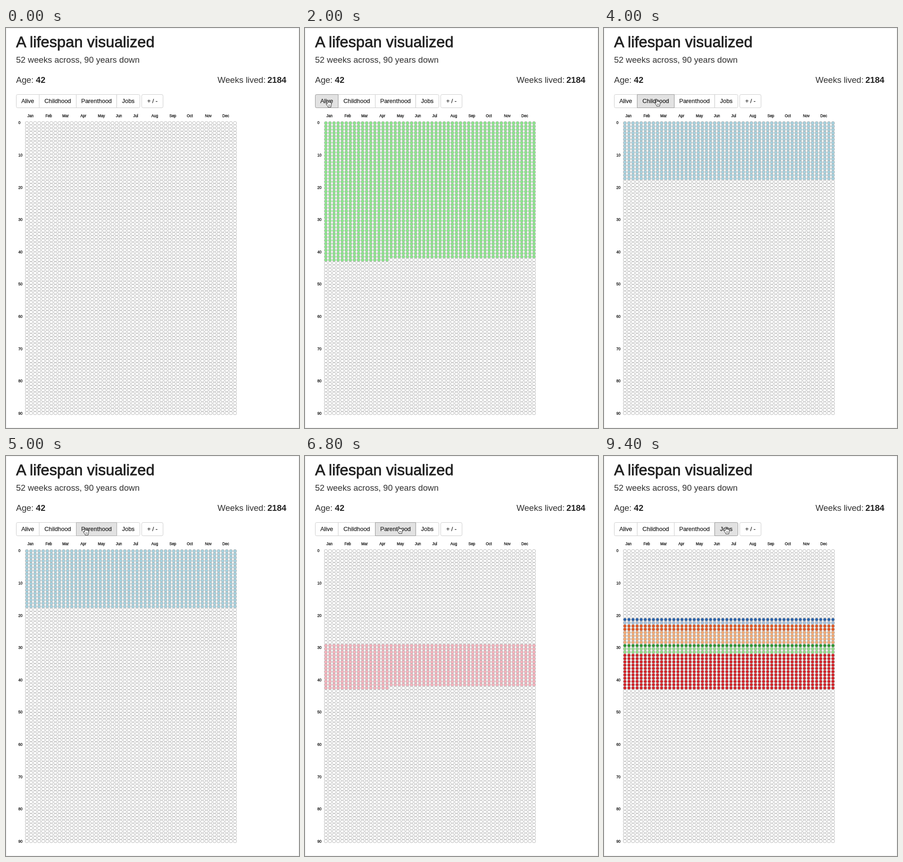
Write an HTML page with a canvas that moves like this. It is 640 px wide and 875 px high and loops after 9800 ms.

```html
<!DOCTYPE html>
<html lang="en">
<head>
<meta charset="utf-8">
<title>A lifespan visualized</title>
<style>
  html, body { margin: 0; width: 100%; height: 100%; overflow: hidden; background: #fff; }
  canvas, svg { position: absolute; left: 0; top: 0; width: 640px; height: 875px; }
  text { font-family: "Liberation Sans", Arial, sans-serif; fill: #222; white-space: pre; }
  .title { font-size: 33.6px; stroke: #222; stroke-width: .8px; }
  .lead { font-size: 18.6px; fill: #303030; }
  .bold { font-size: 18.6px; font-weight: bold; }
  .btn { font-size: 12.9px; text-anchor: middle; stroke: #222; stroke-width: .25px; }
  .tick { font-size: 8.3px; fill: #111; stroke: #111; stroke-width: .3px; }
</style>
</head>
<body>
<canvas id="grid" width="640" height="875"></canvas>
<svg id="ui" viewBox="0 0 640 875"></svg>
<script>
const LOOP = 9800, STEP = 200, DAY = 864e5;
const COLS = 52, ROWS = 90, X0 = 45.6, Y0 = 208, DX = 8.912, DY = 7.129, R = 3.56;

const ctx = document.getElementById('grid').getContext('2d');
const ui = document.getElementById('ui');

function add(tag, attrs, text) {
  const el = document.createElementNS('http://www.w3.org/2000/svg', tag);
  for (const k in attrs) el.setAttribute(k, attrs[k]);
  if (text) el.textContent = text;
  ui.appendChild(el);
  return el;
}
const label = (x, y, cls, text) => add('text', { x, y, class: cls }, text);

// Button outline with left and right corner radius
function boxPath({ x1, x2, l, r }) {
  const y1 = 145.5, y2 = 174.5;
  return `M${x1 + l} ${y1}H${x2 - r}a${r} ${r} 0 0 1 ${r} ${r}V${y2 - r}a${r} ${r} 0 0 1 ${-r} ${r}` +
    `H${x1 + l}a${l} ${l} 0 0 1 ${-l} ${-l}V${y1 + l}a${l} ${l} 0 0 1 ${l} ${-l}z`;
}

const edges = [22.5, 72.5, 153.5, 241.8, 292.5];
const buttons = ['Alive', 'Childhood', 'Parenthood', 'Jobs'].map((name, i) => (
  { name, x1: edges[i], x2: edges[i + 1], l: i === 0 ? 3 : 0, r: i === 3 ? 3 : 0 }));
buttons.push({ name: '+ / -', x1: 296.5, x2: 343, l: 3, r: 3 });

for (const b of buttons) add('path', { d: boxPath(b), fill: '#fff', stroke: '#ccc' });
const lit = add('path', { d: '' });
for (const b of buttons) label((b.x1 + b.x2) / 2, 164.3, 'btn', b.name);

add('rect', { x: .5, y: .5, width: 639, height: 874, fill: 'none', stroke: '#ececec' });
label(22, 41.8, 'title', 'A lifespan visualized');
label(22, 76, 'lead', '52 weeks across, 90 years down');
label(22, 120, 'lead', 'Age:');
label(65.3, 120, 'bold', '42');
label(462, 120, 'lead', 'Weeks lived:');
label(571, 120, 'bold', '2184');

// Month names start at the first day of each month in a leap year
'Jan Feb Mar Apr May Jun Jul Aug Sep Oct Nov Dec'.split(' ').forEach((name, i) => {
  const day = (Date.UTC(2016, i) - Date.UTC(2016, 0)) / DAY;
  label(46.8 + day * 1.271, 195, 'tick', name);
});
for (let y = 0; y <= 90; y += 10) label(27, 210.3 + y * 7.062, 'tick', String(y));

const arrow = add('path', {
  d: 'M-4 -7V5.5L-1.2 3L.8 7.5L2.8 6.6L.9 2.3H4.6z',
  fill: '#111', stroke: '#fff', 'stroke-width': .9
});
const hand = add('g', {});
const handPart = (d, fill, w) => hand.appendChild(add('path', {
  d, fill, stroke: '#222', 'stroke-width': w, 'stroke-linejoin': 'round'
}));
handPart('M-3.2 1V-6.2a1.2 1.2 0 0 1 2.4 0V-2.2q.3-1 1.3-1q1 0 1.2 1q.4-.7 1.2-.6q1 .1 1.1 1' +
  'q1.6-.3 1.7 1.2V2.5q0 1.5-1 3V7.5H-2V6q-2-2-3.5-4.5q-.8-1.4.2-1.8q1-.3 2.1 1.3z', '#fff', 1);
handPart('M-.6 2v2.8M1.2 2v2.8M3 2v2.8', 'none', .7);

// Each view gives the colour of a week
const rgb = hex => [1, 3, 5].map(i => parseInt(hex.substr(i, 2), 16));
const white = rgb('#ffffff');
const span = (from, to, hex, c = rgb(hex)) => w => w >= from && w < to ? c : white;
const now = 42 * COLS + 16;
const empty = () => white;
const alive = span(0, now, '#8ce88c');
const child = span(0, 18 * COLS, '#a8d3e0');
const parent = span(29 * COLS, now, '#f8b4be');

const jobs = [];
let year = 21;
function job(years, hex) {
  for (const c = rgb(hex); years > 0; years--) jobs[year++] = c;
}
job(1, '#2c64ac');
job(1, '#a5c2de');
job(2, '#e45824');
job(4, '#f4aa74');
job(1, '#2e9832');
job(2, '#92dc88');
job(11, '#d62228');
const work = w => jobs[Math.floor(w / COLS)] || white;

// One click per button; lead is how far the fade is in at that step
const FADE = 280;
const clicks = [
  { at: 1800, lead: 160, view: alive },
  { at: 3800, lead: 60, view: child },
  { at: 6400, lead: 60, view: parent },
  { at: 8200, lead: 160, view: work }
];

// Pointer moves: from, to, x, y
const moves = [
  [600, 1400, 52, 165.5], [2600, 3000, 113, 162], [3200, 3600, 117, 163.5],
  [4800, 5200, 195, 166], [5600, 6000, 199, 166], [6200, 6800, 207, 162],
  [7000, 7800, 268, 163]
];
const smooth = k => k * k * (3 - 2 * k);
const easeOut = k => 1 - (1 - k) ** 2;

function pointer(t) {
  let x = 4, y = 162;
  for (const [from, to, mx, my] of moves) {
    if (t < from) break;
    const k = smooth(Math.min(1, (t + STEP - from) / (to + STEP - from)));
    x += (mx - x) * k;
    y += (my - y) * k;
  }
  return { x, y };
}

function drawGrid(before, after, k) {
  ctx.fillStyle = '#fff';
  ctx.fillRect(0, 0, 640, 875);
  ctx.lineWidth = .89;
  ctx.strokeStyle = '#acacac';
  for (let w = 0; w < ROWS * COLS; w++) {
    const a = before(w), b = after(w);
    ctx.fillStyle = `rgb(${a.map((v, i) => Math.round(v + (b[i] - v) * k))})`;
    ctx.beginPath();
    ctx.arc(X0 + w % COLS * DX, Y0 + Math.floor(w / COLS) * DY, R, 0, 7);
    ctx.fill();
    ctx.stroke();
  }
}

function show(el, on) {
  el.setAttribute('visibility', on ? 'visible' : 'hidden');
}

function drawPointer(t, clicked) {
  const { x, y } = pointer(t);
  const inside = t >= moves[0][0];
  const over = buttons.findIndex(b => x - 2 >= b.x1 && x - 2 < b.x2);
  for (const el of [hand, arrow]) el.setAttribute('transform', `translate(${x} ${y})`);
  show(hand, inside && over >= 0);
  show(arrow, inside && over < 0);
  show(lit, inside && over >= 0);
  if (over < 0) return;
  const focus = clicked === over;
  lit.setAttribute('d', boxPath(buttons[over]));
  lit.setAttribute('fill', focus && t === clicks[over].at ? '#d4d4d4' : '#e2e2e2');
  lit.setAttribute('stroke', focus ? '#959595' : '#a8a8a8');
}

let shown = -1, gridKey = '';
function draw(t) {
  const last = clicks.filter(c => c.at <= t).length - 1;
  const click = clicks[last];
  const k = click ? easeOut(Math.min(1, (t - click.at + click.lead) / FADE)) : 1;
  const key = last + ':' + k;
  if (key !== gridKey) {
    gridKey = key;
    drawGrid(last > 0 ? clicks[last - 1].view : empty, click ? click.view : empty, k);
  }
  drawPointer(t, last);
}

const start = performance.now();
function tick() {
  const t = Math.floor((performance.now() - start) % LOOP / STEP) * STEP;
  if (t !== shown) draw(shown = t);
  requestAnimationFrame(tick);
}
tick();
</script>
</body>
</html>
```
